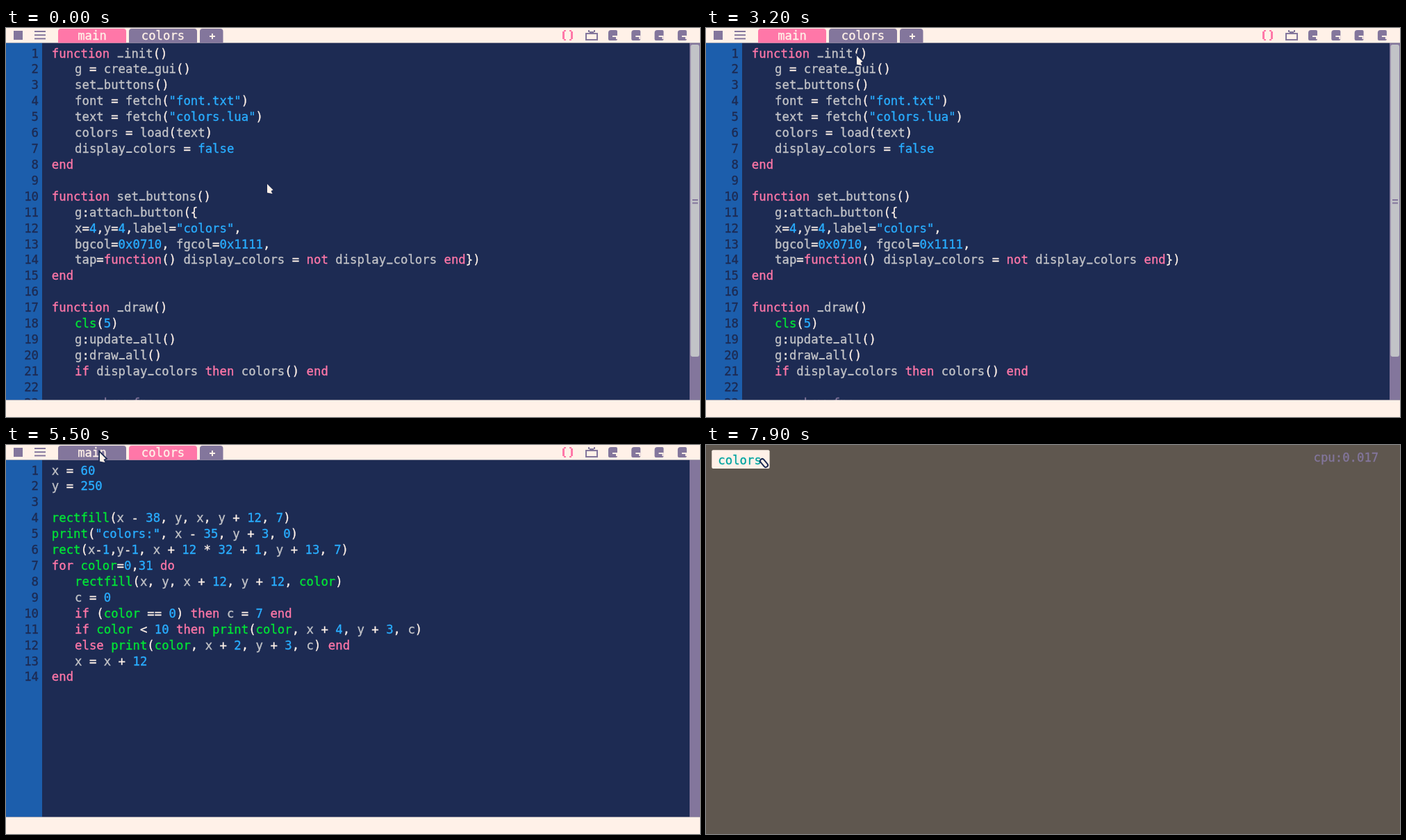
An HTML page with a canvas that plays this animation: 999x561 px, repeating every 8000 ms.

```html
<!DOCTYPE html>
<html lang="en">
<head>
<meta charset="utf-8">
<title>Code editor</title>
<style>
html, body { margin: 0; height: 100%; overflow: hidden; background: #1d2b53; }
canvas { display: block; }
</style>
</head>
<body>
<canvas id="stage" width="999" height="561"></canvas>
<script>
const ctx = document.getElementById('stage').getContext('2d');
const LOOP = 8000, TICK = 100, SWITCH = 3800, RUN = 6700;
const CELL = 10.42, LINE = 22.92, BASE = 42.5, LEFT = 65.8, TAB = 33.3;
const NAVY = '#1d2b53', CREAM = '#fff1e8', PINK = '#ff77a8', PURPLE = '#83769c',
  GRAY = '#c2c3c7', BLUE = '#29adff', GREEN = '#00e436', SEA = '#1c5eac',
  TEAL = '#00a5a1', BROWN = '#5f574f';

const MAIN = `function _init()
\tg = create_gui()
\tset_buttons()
\tfont = fetch("font.txt")
\ttext = fetch("colors.lua")
\tcolors = load(text)
\tdisplay_colors = false
end

function set_buttons()
\tg:attach_button({
\tx=4,y=4,label="colors",
\tbgcol=0x0710, fgcol=0x1111,
\ttap=function() display_colors = not display_colors end})
end

function _draw()
\tcls(5)
\tg:update_all()
\tg:draw_all()
\tif display_colors then colors() end

\t-- show fps`.split('\n');

const COLORS = `x = 60
y = 250

rectfill(x - 38, y, x, y + 12, 7)
print("colors:", x - 35, y + 3, 0)
rect(x-1,y-1, x + 12 * 32 + 1, y + 13, 7)
for color=0,31 do
\trectfill(x, y, x + 12, y + 12, color)
\tc = 0
\tif (color == 0) then c = 7 end
\tif color < 10 then print(color, x + 4, y + 3, c)
\telse print(color, x + 2, y + 3, c) end
\tx = x + 12
end`.split('\n');

// Pointer strokes: start time, duration, where the tip comes to rest
const HOME = [376, 225];
const MOVES = [
  [0, 700, 260, 259], [800, 400, 296, 200], [1200, 500, 229, 19],
  [1760, 440, 234, 398], [2200, 200, 227, 374], [2700, 500, 217, 40],
  [3200, 300, 226, 11], [4100, 600, 213, 305], [4700, 400, 124, 2],
  [5200, 300, 135, 11], [5900, 400, 129, 58], [RUN, 500, 104, 100],
  [7300, 600, 78, 20]
];

function rect(x, y, w, h, color) {
  ctx.fillStyle = color;
  ctx.fillRect(x, y, w, h);
}

function panel(x, y, w, h, radii, color) {
  ctx.fillStyle = color;
  ctx.beginPath();
  ctx.roundRect(x, y, w, h, radii);
  ctx.fill();
}

function text(str, x, y, color) {
  ctx.font = '17.28px "DejaVu Sans Mono", monospace';
  ctx.fillStyle = ctx.strokeStyle = color;
  ctx.lineWidth = 0.35;
  for (const ch of str) {
    if (ch === '_') ctx.fillRect(x + 1, y - 2, 8.4, 2);
    else {
      ctx.fillText(ch, x, y);
      ctx.strokeText(ch, x, y);
    }
    x += CELL;
  }
  return x;
}

function tokenColor(s) {
  if (s.startsWith('--')) return PURPLE;
  if (/^["\d]|^false$/.test(s)) return BLUE;
  if (/^(function|end|not|if|then|else|for|do)$/.test(s)) return PINK;
  if (/^(cls|rectfill|rect|print|color)$/.test(s)) return GREEN;
  return /^\w/.test(s) ? GRAY : CREAM;
}

function codeLine(line, row) {
  const y = BASE + row * LINE, num = String(row + 1);
  text(num, 47 - num.length * CELL, y, NAVY);
  let x = LEFT;
  for (const s of line.match(/\t|--.*|"[^"]*"|\w+|\s+|[^\w\s]/g) || [])
    x = s === '\t' ? x + TAB : text(s, x, y, tokenColor(s));
}

function tab(x, w, label, active) {
  panel(x, 1, w, 20.5, [4, 4, 0, 0], active ? PINK : PURPLE);
  text(label, x + (w - label.length * CELL) / 2, 17, CREAM);
}

function toolbar(onMain) {
  rect(0, 0, 999, 21.5, CREAM);
  rect(11, 4, 13, 13, PURPLE);
  for (let i = 0; i < 3; i++) rect(41, 4 + i * 5.2, 16, 2, PURPLE);
  tab(75, 98, 'main', onMain);
  tab(177, 98, 'colors', !onMain);
  tab(279, 33.5, '', false);
  rect(293, 11, 8, 2, CREAM);
  rect(296, 8, 2, 8, CREAM);
  // brackets
  for (const side of [-1, 1]) {
    rect(807 + side * 6, 5, 3, 11, PINK);
    for (const y of [3, 16]) rect(807 + side * 4, y, 3, 2, PINK);
  }
  // television
  ctx.strokeStyle = PURPLE;
  ctx.lineWidth = 2;
  ctx.strokeRect(835, 8, 16, 9);
  for (const x of [838, 846]) rect(x, 3, 2, 3, PURPLE);
  rect(840, 5, 6, 3, PURPLE);
  // pages
  for (let i = 0; i < 4; i++) {
    const x = 867 + i * 33.3;
    panel(x, 3, 13, 15, [4, 2, 2, 2], PURPLE);
    rect(x + 6, 11, 7, 2, CREAM);
    rect(x + 11, 13, 2, 3, CREAM);
  }
}

function caret(t, from, to, x, row) {
  if (t >= from && t < to && (t - from) % 700 < 270)
    rect(x, BASE + row * LINE - 16.5, 10.6, 19, PINK);
}

function editor(t) {
  const onMain = t < SWITCH;
  rect(0, 0, 999, 561, NAVY);
  rect(0, 21.5, 52, 515, SEA);
  (onMain ? MAIN : COLORS).forEach(codeLine);
  rect(984, 21.5, 15, 515, PURPLE);
  if (onMain) {
    panel(985.5, 24, 12.5, 450, 3, GRAY);
    for (const y of [247, 251.5]) rect(988, y, 8, 2, PURPLE);
  }
  rect(0, 536.5, 999, 25, CREAM);
  toolbar(onMain);
  caret(t, 400, 2100, 256.3, 10);
  caret(t, 2800, SWITCH, 98, 14);
  caret(t, 4400, RUN, 98, 13);
}

function program(t, hover) {
  rect(0, 0, 999, 561, BROWN);
  panel(8.3, 7.3, 83.3, 26.7, 2, hover ? CREAM : SEA);
  text('colors', 17.3, 27.5, TEAL);
  const load = 14 + Math.round((t - RUN) / 400);
  text('cpu:0.0' + load, 874.5, 23.5, PURPLE);
}

function arrow(x, y) {
  ctx.beginPath();
  ctx.moveTo(x, y);
  ctx.lineTo(x + 8.5, y + 8.5);
  ctx.lineTo(x + 5.5, y + 10);
  ctx.lineTo(x + 7.5, y + 14);
  ctx.lineTo(x, y + 12.5);
  ctx.closePath();
  ctx.lineWidth = 3.6;
  ctx.strokeStyle = NAVY;
  ctx.stroke();
  ctx.fillStyle = CREAM;
  ctx.fill();
}

function finger(x, y) {
  ctx.lineCap = 'round';
  for (const [width, color] of [[8, NAVY], [4, CREAM]]) {
    ctx.lineWidth = width;
    ctx.strokeStyle = color;
    ctx.beginPath();
    ctx.moveTo(x + 3, y + 3);
    ctx.lineTo(x + 8, y + 9);
    ctx.stroke();
  }
}

function tipAt(t) {
  let [x, y] = HOME;
  for (const [start, span, toX, toY] of MOVES) {
    const k = Math.min(1, Math.max(0, (t - start) / span));
    const ease = k * k * (3 - 2 * k);
    x += (toX - x) * ease;
    y += (toY - y) * ease;
  }
  return [x, y];
}

function draw(now) {
  // the screen refreshes ten times a second
  const t = Math.floor((now % LOOP) / TICK) * TICK;
  const [x, y] = tipAt(t);
  const running = t >= RUN;
  const hover = running && x > 8 && x < 91 && y > 7 && y < 34;
  if (running) program(t, hover);
  else editor(t);
  if (hover) finger(x, y);
  else arrow(x, y);
}

let start;
function frame(now) {
  start ??= now;
  draw(now - start);
  requestAnimationFrame(frame);
}
draw(0);
requestAnimationFrame(frame);
</script>
</body>
</html>
```
